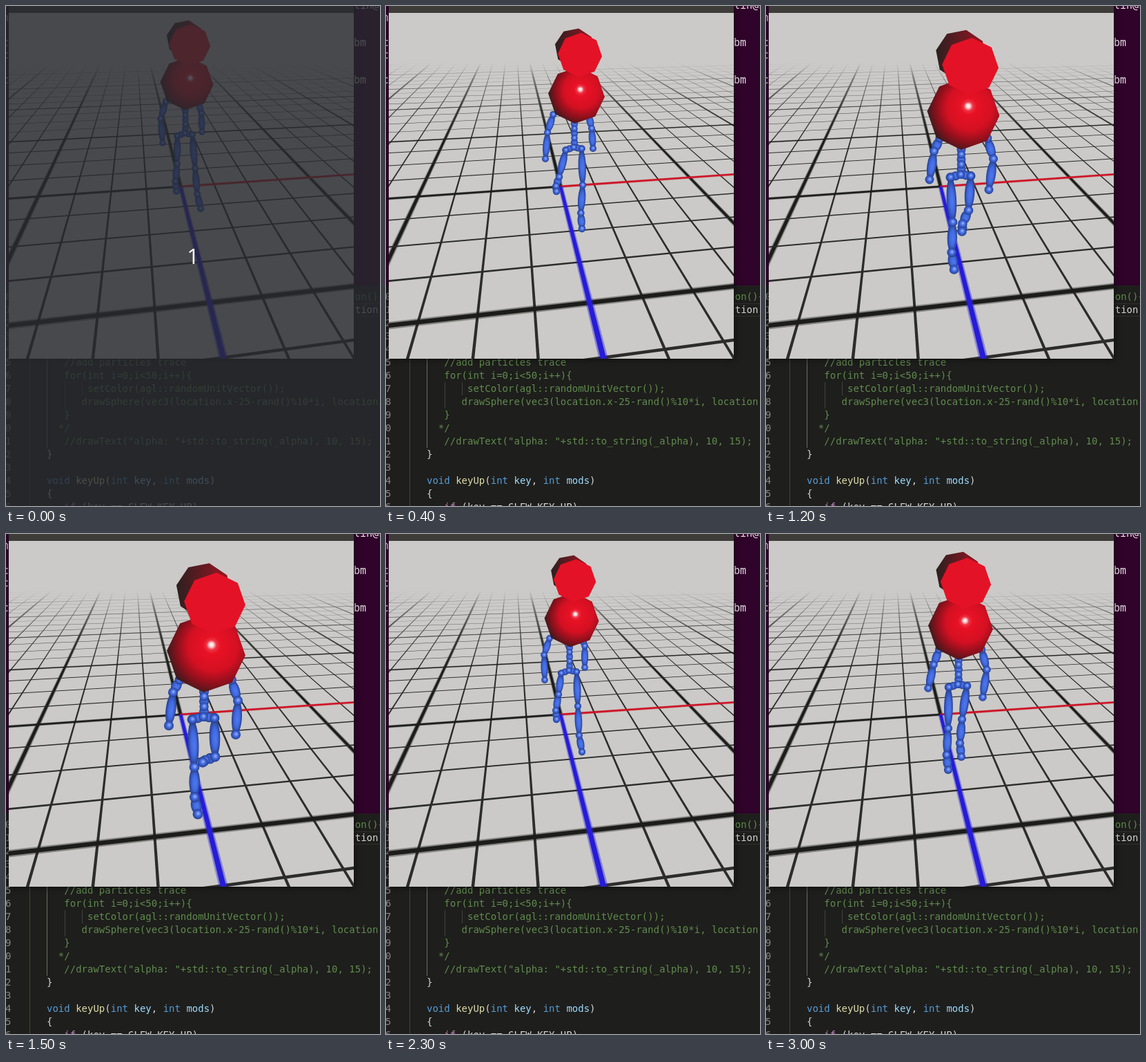
Write an HTML page with a canvas that moves like this. It is 542 px wide and 723 px high and loops after 3100 ms.

```html
<!DOCTYPE html>
<html lang="en">
<head>
<meta charset="utf-8">
<title>Walking figure</title>
<style>
html, body { margin: 0; width: 542px; height: 723px; overflow: hidden; background: #30032a }
body { position: relative }
body > * { position: absolute; margin: 0 }
pre { font: 14px/19px "DejaVu Sans Mono", monospace; color: #608b4e }
.term { top: -10px; font-size: 15px; line-height: 18px; color: #e6e2e4 }
#editor { top: 404px; width: 542px; height: 319px; background: #1e1e1c }
#current { top: 430px; width: 542px; height: 17px; border: solid #30302e; border-width: 1px 0 }
.guide { width: 1px; background: #42423f }
canvas { left: 4px; top: 0; border-top: 10px solid #3d3c39; box-shadow: 0 1px 9px rgba(0,0,0,.6) }
.k { color: #569cd6 } .f { color: #dcdcaa } .p { color: #9cdcfe } .w { color: #d4d4d4 } .i { color: #c586c0 }
#count { inset: 0; background: rgba(39,42,47,.8); color: #fff; font: 31px/723px "Open Sans", sans-serif; text-align: center }
</style>
</head>
<body>
<pre class="term" style="left:-5px">

h

c
c

c</pre>
<pre class="term" style="left:504px">lin@k


bm


bm</pre>
<div id="editor"></div>
<div id="current"></div>
<div class="guide" style="left:34px;top:506px;height:217px"></div>
<div class="guide" style="left:59px;top:506px;height:133px;background:#6a6a66"></div>
<div class="guide" style="left:85px;top:544px;height:38px"></div>
<div class="guide" style="left:110px;top:544px;height:19px"></div>
<pre style="left:-1px;top:411px;color:#858585">0
1
2
3
4
5
6
7
8
9
0
1
2
3
4
5
6</pre>
<pre style="left:59px;top:411px">                                                     on(){
<span class="w">                                                     tion</span>



   //add particles trace
   for(int i=0;i&lt;50;i++){
       setColor(agl::randomUnitVector());
      drawSphere(vec3(location.x-25-rand()%10*i, location.
   }
  */
   //drawText("alpha: "+std::to_string(_alpha), 10, 15);
<span class="w">}

<span class="k">void</span> <span class="f">keyUp</span>(<span class="k">int</span> <span class="p">key</span>, <span class="k">int</span> <span class="p">mods</span>)
{
   <span class="i">if</span> (key == GLFW_KEY_UP)</span></pre>
<canvas width="500" height="500"></canvas>
<div id="count">1</div>
<script>
const ctx = document.querySelector('canvas').getContext('2d');
const count = document.getElementById('count');
const BACK = '203,202,200', TAU = Math.PI * 2;
ctx.translate(-4, -10);

// walk time, chest x y r, then elbow/hand left and right, knee/foot left and right
const poses = [
  [0, 256, 101, 37, 223, 152, 223, 186, 284, 151, 287, 179, 247, 217, 247, 268, 270, 219, 266, 268],
  [300, 262, 112, 38.5, 224, 163, 227, 198, 283, 155, 284, 182, 248, 228, 247, 268, 274, 235, 282, 293],
  [500, 269, 124, 39.5, 229, 175, 230, 211, 288, 162, 288, 193, 250, 232, 247, 268, 278, 249, 284, 315],
  [800, 276, 129, 41, 234, 183, 231, 221, 298, 177, 300, 206, 251, 247, 247, 268, 285, 259, 284, 322],
  [1200, 282, 135, 47, 243, 189, 235, 223, 320, 196, 314, 236, 264, 281, 264, 341, 284, 268, 283, 322],
  [1300, 282, 139, 48, 245, 191, 238, 225, 323, 201, 313, 241, 268, 288, 267, 357, 284, 269, 283, 322],
  [1900, 290, 172, 57, 242, 229, 236, 277, 336, 241, 333, 290, 273, 337, 278, 405, 303, 322, 285, 330]
];

function poseAt(time) {
  let i = 0;
  while (i < poses.length - 2 && poses[i + 1][0] <= time) i++;
  const a = poses[i], b = poses[i + 1], k = (time - a[0]) / (b[0] - a[0]);
  return a.map((v, j) => v + (b[j] - v) * k);
}

function fillPoly(points, fill) {
  ctx.beginPath();
  points.forEach(p => ctx.lineTo(...p));
  ctx.fillStyle = fill;
  ctx.fill();
}

// Ground plane to screen; one unit is the distance between bold lines.
function ground(x, z) {
  const a = .0496 * x, b = -.377 * z, d = 1 + a + b;
  return [(253 + 4210 * a + 183.6 * b) / d, (261 - 16 * a - 16.6 * b) / d];
}

function strip(x0, z0, x1, z1, half, fill) {
  const [dx, dz] = z0 === z1 ? [0, half] : [half, 0];
  fillPoly([ground(x0 - dx, z0 - dz), ground(x1 + dx, z0 - dz),
    ground(x1 + dx, z1 + dz), ground(x0 - dx, z1 + dz)], fill);
}

function bold(x0, z0, x1, z1, rgb = '28,28,26') {
  strip(x0, z0, x1, z1, .018, `rgba(${rgb},.4)`);
  strip(x0, z0, x1, z1, .011, `rgb(${rgb})`);
}

function drawGround() {
  const X0 = -4, X1 = 5, Z0 = -5, Z1 = 1.4;
  ctx.fillStyle = `rgb(${BACK})`;
  ctx.fillRect(4, 10, 500, 500);
  const line = (i, ...ends) => i % 4 ? strip(...ends, .006, '#2c2c2a') : i && bold(...ends);
  for (let i = X0 * 4; i <= X1 * 4; i++) line(i, i / 4, Z0, i / 4, Z1);
  for (let i = Z0 * 4; i <= Z1 * 4; i++) line(i, X0, i / 4, X1, i / 4);
  bold(X0, 0, 0, 0);
  bold(0, Z0, 0, 0);
  bold(0, 0, X1, 0, '205,18,36');
  bold(0, 0, 0, Z1, '38,28,215');
  const fog = ctx.createLinearGradient(0, 82, 0, 200);
  [[0, 1], [.2, .5], [.55, .15], [1, 0]].forEach(([at, alpha]) => fog.addColorStop(at, `rgba(${BACK},${alpha})`));
  ctx.fillStyle = fog;
  ctx.fillRect(4, 10, 500, 190);
}

function blob(x, y, rx, ry, angle, core) {
  ctx.save();
  ctx.translate(x, y);
  ctx.rotate(angle);
  ctx.scale(rx, ry);
  const g = ctx.createRadialGradient(.1, -.15, 0, 0, 0, 1);
  g.addColorStop(0, core);
  g.addColorStop(.5, '#4169e1');
  g.addColorStop(1, '#263f8c');
  ctx.fillStyle = g;
  ctx.beginPath();
  ctx.arc(0, 0, 1, 0, TAU);
  ctx.fill();
  ctx.restore();
}

// Chain of ellipsoid bones with a ball at each joint.
function limb(points, size) {
  points.slice(1).forEach(([x, y], i) => {
    const [px, py] = points[i];
    blob((x + px) / 2, (y + py) / 2, Math.hypot(x - px, y - py) / 2, size * 1.05, Math.atan2(y - py, x - px), '#5078ec');
  });
  points.forEach(([x, y]) => blob(x, y, size, size, 0, '#9db6fa'));
}

function octagon(x, y, r, turn, fill) {
  fillPoly(Array.from({ length: 8 }, (_, i) => {
    const a = turn + i * TAU / 8;
    return [x + r * Math.cos(a), y + r * Math.sin(a)];
  }), fill);
}

function drawFigure(time) {
  const [, x, y, r, ...v] = poseAt(time);
  const joint = i => [v[i * 2], v[i * 2 + 1]];
  const near = (r - 37) / 20, size = r * .13;
  const px = x - Math.min(4, (r - 37) * 2), py = y + r * (1.97 - .3 * near), hip = r * .28;

  const leg = (side, i) => {
    const knee = joint(i), foot = joint(i + 1);
    const ankle = [knee[0] + (foot[0] - knee[0]) * .64 - r * .05, knee[1] + (foot[1] - knee[1]) * .64];
    limb([[px + side * hip, py - side], knee, ankle, foot], size);
  };
  const arm = i => {
    const elbow = joint(i);
    limb([[x + (elbow[0] - x) * .8, y + r * .68], elbow, joint(i + 1)], size * .95);
  };
  leg(1, 6);
  leg(-1, 4);
  const top = y + r * .85;
  limb([0, 1, 2, 3].map(i => [px + 1, top + (py - 3 - top) * i / 3]), size * .9);
  limb([[px - hip, py + 1], [px, py - 3], [px + hip, py - 1]], size * .9);
  arm(0);
  arm(2);

  const hx = x + r * .13, hy = y - r * .21;
  const skin = ctx.createRadialGradient(hx, hy, 0, x + r * .22, y - r * .12, r * 1.25);
  [[0, '#fff'], [.04, '#ffdcdc'], [.1, '#ee3345'], [.18, '#e81124'], [.5, '#d41022'], [.75, '#8c101c'], [1, '#301c1c']]
    .forEach(stop => skin.addColorStop(...stop));
  octagon(x, y, r, .06, skin);

  const bx = x - r * .06, by = y - r * (1.68 - .1 * near);
  const shade = ctx.createLinearGradient(bx - r * .7, 0, bx + r * .7, 0);
  shade.addColorStop(0, '#2c2020');
  shade.addColorStop(1, '#a01422');
  octagon(bx, by, r * .71, .2, shade);
  octagon(x + r * (.1 + .12 * near), y - r * (1.46 - .2 * near), r * .78, .06, '#e41226');
}

function frame(now) {
  const t = Math.floor(now % 3100 / 100) * 100;
  drawGround();
  drawFigure(t === 0 ? 300 : t < 1800 ? t + 400 : t - 1800);
  count.hidden = t > 0;
  requestAnimationFrame(frame);
}
requestAnimationFrame(frame);
</script>
</body>
</html>
```
